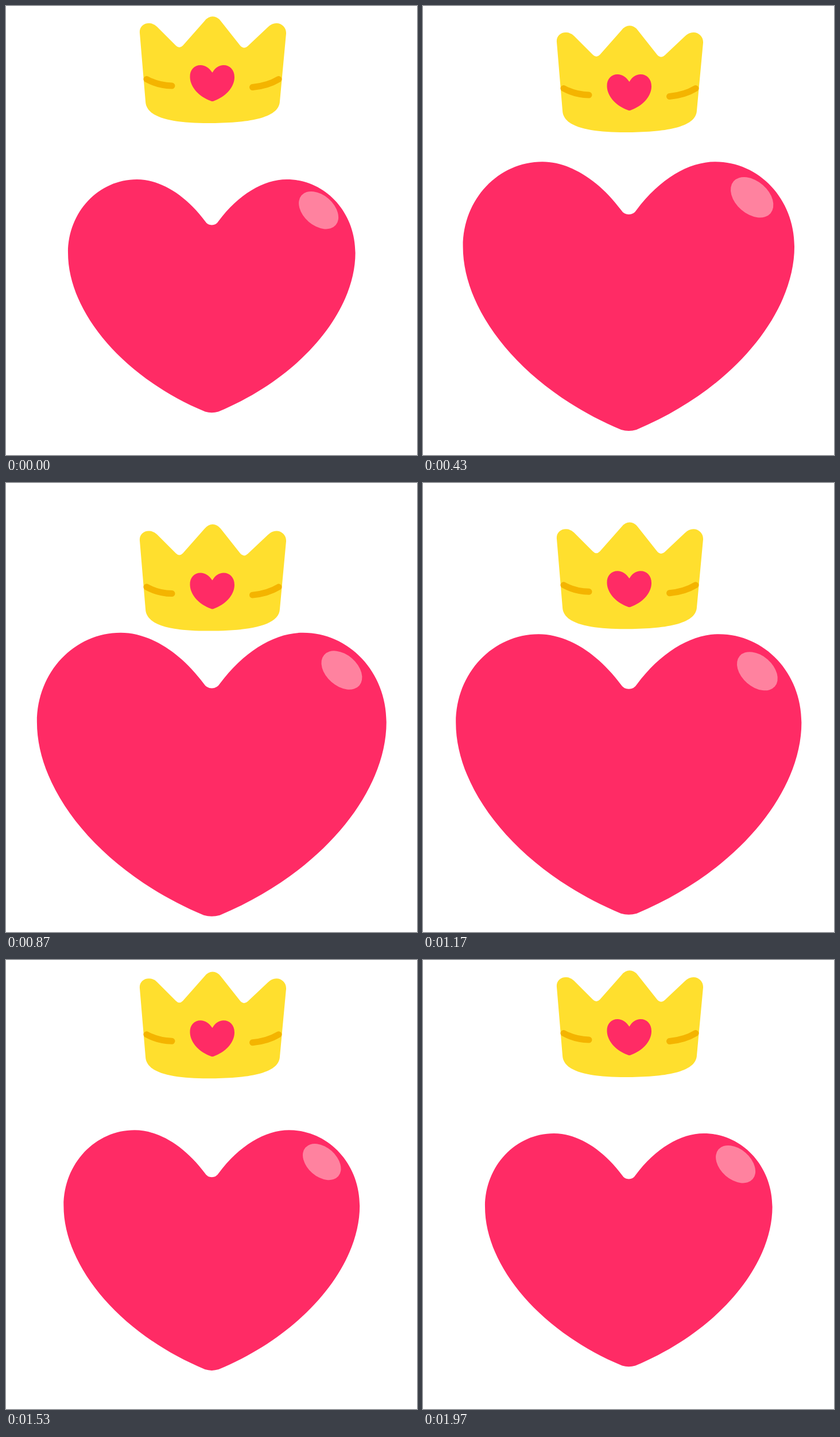
An HTML page that plays this animation: 716 px wide and 782 px high, repeating every 2000 ms.

```html
<!DOCTYPE html>
<html lang="en">
<head>
<meta charset="utf-8">
<title>Heart and crown</title>
<style>
  html, body { margin: 0; width: 100%; height: 100%; overflow: hidden; background: #fff; }
  svg { display: block; width: 100vw; height: 100vh; }
</style>
</head>
<body>
<svg viewBox="0 0 716 782">
  <g id="heart" fill="#ff2b65">
    <path d="M347 375C312 328 268 302 228 302C162 302 108 358 108 430C108 530 200 645 347 706.5
      Q358.3 710 370 706.5C517 645 608.6 530 608.6 430C608.6 358 555 302 489 302C449 302 405 328 370 375
      Q366 381.5 358.5 381.5Q351 381.5 347 375Z"/>
    <ellipse id="shine" rx="39.5" ry="26.5" fill="#ff829f"/>
  </g>
  <g id="crown">
    <path fill="#ffdf2e" d="M233 47C232 37 239 30 249 30Q257 30 263 36L296 69Q302 75 308 69L346 26
      Q352 18.3 360 18.3Q368 18.3 374 26L408 69Q414.5 76 421 70L456 37Q463 30 471 30
      C481 30 488.5 38 488 48L477 166C476 196 420 204 352 204C290 204 244 195 243 166Z"/>
    <g fill="none" stroke="#f4b400" stroke-width="11" stroke-linecap="round">
      <path d="M245 127.5Q265 138.500 289 139"/>
      <path d="M429.5 141.500Q456 139 475 127.500"/>
    </g>
    <path fill="#ff2b65" d="M359.5 116C354 108 347 103 339 103C328 103 320 111 320.5 124
      C321 143 339 159 356 165Q359.5 167 363 165C380 159 398 143 398 124
      C398 111 390 103 379 103C371 103 364 108 359.5 116Z"/>
  </g>
</svg>
<script>
  const LOOP = 2000, SPAN = 59, HOPS = 4, HOP_DEPTH = 69.5;
  const [heart, shine, crown] = ['heart', 'shine', 'crown'].map(id => document.getElementById(id));

  // Timing curve through (x1, 0) and (x2, 1), solved by bisection.
  function ease(x, x1, x2) {
    let lo = 0, hi = 1;
    for (let i = 0; i < 30; i++) {
      const t = (lo + hi) / 2, u = 1 - t;
      if (3 * u * u * t * x1 + 3 * u * t * t * x2 + t * t * t < x) lo = t; else hi = t;
    }
    return lo * lo * (3 - 2 * lo);
  }

  // Goes 0 to 1 and back within one cycle, easing each half alike.
  function swing(cycles, x1, x2) {
    const half = (cycles % 1) * 2;
    return half < 1 ? ease(half, x1, x2) : 1 - ease(half - 1, x1, x2);
  }

  // 30 steps a second, held on a 10 ms grid.
  function stepAt(ms) {
    const rest = ms % 100;
    return Math.floor(ms / 100) * 3 + (rest < 30 ? 0 : rest < 70 ? 1 : 2);
  }

  function draw(ms) {
    const p = stepAt(ms) / SPAN;
    const wave = (1 - Math.cos(2 * Math.PI * p)) / 2;
    const size = 1 + 0.2176 * swing(p, 0.52, 0.11);
    const sink = 2.8 * wave * wave;
    heart.setAttribute('transform', `translate(358.3 ${505 + sink}) scale(${size}) translate(-358.3 -505)`);
    shine.setAttribute('transform', `translate(544.6 355.7) scale(${1 - 0.16 * wave}) rotate(41)`);
    crown.setAttribute('transform', `translate(0 ${HOP_DEPTH * swing(p * HOPS, 0.85, 0.6)})`);
  }

  const start = performance.now();
  function tick() {
    draw((performance.now() - start) % LOOP);
    requestAnimationFrame(tick);
  }
  tick();
</script>
</body>
</html>
```
